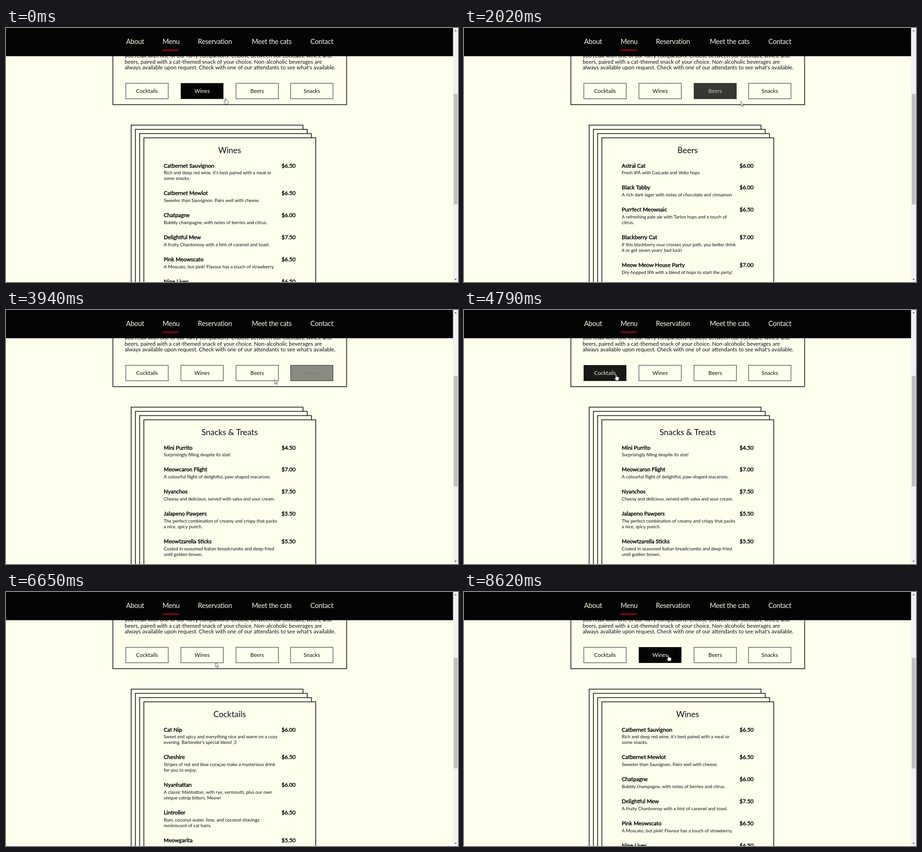
Write an HTML page with a canvas that moves like this. It is 960x540 px and loops after 8.7 s.

```html
<!DOCTYPE html>
<html lang="en">
<head>
<meta charset="utf-8">
<title>Cat café menu</title>
<style>
html, body { margin: 0; width: 100%; height: 100%; overflow: hidden; background: #ffffee; }
canvas { display: block; width: 960px; height: 540px; }
</style>
</head>
<body>
<canvas id="stage" width="960" height="540"></canvas>
<script>
const ctx = document.getElementById('stage').getContext('2d');
const LOOP = 8700;
const CREAM = '#ffffee', INK = '#0c0c12', BLACK = '#040404';
const FONT = 'Lato, "Open Sans", sans-serif';

// Each item: name, price, description lines
const MENUS = {
  Wines: ['Wines', [
    ['Catbernet Sauvignon', '6.50', "Rich and deep red wine, it's best paired with a meal or", 'some snacks.'],
    ['Catbernet Mewlot', '6.50', 'Sweeter than Sauvignon. Pairs well with cheese.'],
    ['Chatpagne', '6.00', 'Bubbly champagne, with notes of berries and citrus.'],
    ['Delightful Mew', '7.50', 'A fruity Chardonnay with a hint of caramel and toast.'],
    ['Pink Meowscato', '6.50', 'A Moscato, but pink! Flavour has a touch of strawberry.'],
    ['Nine Lives', '6.50', 'A smooth red blend with notes of dark cherry.']]],
  Beers: ['Beers', [
    ['Astral Cat', '6.00', 'Fresh IPA with Cascade and Velto hops'],
    ['Black Tabby', '6.00', 'A rich dark lager with notes of chocolate and cinnamon'],
    ['Purrfect Meowsaic', '6.50', 'A refreshing pale ale with Tarlon hops and a touch of', 'citrus.'],
    ['Blackberry Cat', '7.00', 'If this blackberry sour crosses your path, you better drink', "it or get seven years' bad luck!"],
    ['Meow Meow House Party', '7.00', 'Dry-hopped IPA with a blend of hops to start the party!']]],
  Snacks: ['Snacks & Treats', [
    ['Mini Purrito', '4.50', 'Surprisingly filling despite its size!'],
    ['Meowcaron Flight', '7.00', 'A colourful flight of delightful, paw-shaped macarons.'],
    ['Nyanchos', '7.50', 'Cheesy and delicious, served with salsa and sour cream.'],
    ['Jalapeno Pawpers', '5.50', 'The perfect combination of creamy and crispy that packs', 'a nice, spicy punch.'],
    ['Meowtzarella Sticks', '5.50', 'Coated in seasoned Italian breadcrumbs and deep-fried', 'until golden brown.'],
    ['Purrkoras', '4.50', 'Fried veggie goodness, generously seasoned.'],
    ['Sameowsas', '5.50', 'Choose between spicy potato and beef fillings.'],
    ['Veggie Tempurra', '4.50', 'Veggie dipped in batter and deep-fried to perfection.']]],
  Cocktails: ['Cocktails', [
    ['Cat Nip', '6.00', 'Sweet and spicy and everything nice and warm on a cozy', "evening. Bartender's special blend ;3"],
    ['Cheshire', '6.50', 'Stripes of red and blue curaçao make a mysterious drink', 'for you to enjoy.'],
    ['Nyanhattan', '6.00', 'A classic Manhattan, with rye, vermouth, plus our own', 'unique catnip bitters. Meow!'],
    ['Lintroller', '6.50', 'Rum, coconut water, lime, and coconut shavings', 'reminiscent of cat hairs.'],
    ['Meowgarita', '5.50', 'Tequila, solvandre, lime juice, and just a touch of', 'meowzcal for a smoky twist on a classic.'],
    ['Mewjito', '5.50', 'A refreshing cocktail, perfect for lounging in the sun.'],
    ['Moscow Mew', '6.00', 'A fizzy, tangy, sweet, and spicy vodka-based cocktail.'],
    ['Meowtini', '6.00', 'Vodka or Gin as you like it, served in the eponymous glass.']]]
};

// Card swaps: start time and the menu brought to the front
const SWAPS = [[1250, 'Beers'], [2710, 'Snacks'], [5458, 'Cocktails'], [7650, 'Wines']];
const HALF = 335;
// Moments where the card motion hangs: [start, length]
const STALLS = [[2940, 50], [3160, 100]];

// Buttons: label, left edge, hover start, hover end
const BUTTONS = [
  ['Cocktails', 254.5, 4515, 6290],
  ['Wines', 371.5, 6750, LOOP + 30],
  ['Beers', 488.5, 560, 1960],
  ['Snacks', 604.5, 2260, 3780]
];
const FADE = 300;

const NAV = [['About', 255], ['Menu', 332.5], ['Reservation', 407.5], ['Meet the cats', 522], ['Contact', 646.5]];

// Pointer tip: time, x, y
const POINTER = [
  [40, 466, 149], [840, 548, 134], [1930, 548, 134], [2020, 588, 156],
  [2450, 666, 135], [3710, 666, 135], [4130, 500, 157], [4550, 323, 137],
  [4970, 323, 137], [5300, 323, 134], [6190, 323, 134], [6650, 445, 150],
  [7120, 434, 134], [8695, 434, 134]
];

const clamp = v => Math.max(0, Math.min(1, v));
const smooth = v => { v = clamp(v); return v * v * (3 - 2 * v); };
const mix = (a, b, k) => a + (b - a) * k;

function text(str, x, y, size, color = INK, align = 'left') {
  ctx.font = `${size}px ${FONT}`;
  ctx.fillStyle = color;
  ctx.textAlign = align;
  ctx.fillText(str, x, y);
}

function boldText(str, x, y, align) {
  text(str, x, y, 11.65, '#000', align);
  ctx.strokeStyle = '#000';
  ctx.lineWidth = 0.45;
  ctx.strokeText(str, x, y);
}

function panel(x, y, w, h, line = 1.5) {
  ctx.fillStyle = CREAM;
  ctx.fillRect(x, y, w, h);
  ctx.strokeStyle = INK;
  ctx.lineWidth = line;
  ctx.strokeRect(x, y, w, h);
}

// dx, dy are offsets from the front place in the stack
function card(dx, dy, menu) {
  ctx.save();
  ctx.translate(dx, dy);
  panel(292.75, 233.5, 365, 496);
  if (menu) {
    const [title, items] = MENUS[menu];
    text(title, 475, 266, 17.4, INK, 'center');
    let y = 296.5;
    for (const [name, price, ...lines] of items) {
      boldText(name, 335, y);
      boldText('$' + price, 615, y, 'right');
      lines.forEach((s, i) => text(s, 335, y + 14.8 + i * 12, 9.71));
      y += 34.8 + lines.length * 12;
    }
  }
  ctx.restore();
}

function stack(t) {
  let clock = t;
  for (const [at, len] of STALLS) {
    if (t > at && t < 3600) clock -= Math.min(len, t - at);
  }
  let front = 'Wines', moving = null, age = 0;
  for (const [start, menu] of SWAPS) {
    if (clock < start) break;
    if (clock < start + 2 * HALF) { moving = menu; age = clock - start; }
    else front = menu;
  }
  if (!moving) {
    for (let i = 3; i >= 0; i--) card(-9 * i, -9 * i, i ? null : front);
    return;
  }
  const back = smooth(age / HALF - 1);
  const out = age < HALF ? smooth(age / HALF) : 1 - back;
  const settle = back * back;
  const base = -27 * (1 - settle);
  const drawMoving = () => card(base - 266.5 * out, base - 372.5 * out, moving);
  const onTop = age >= HALF || out > 0.4;
  if (!onTop) drawMoving();
  for (let i = 2; i >= 0; i--) {
    const d = -9 * (i + settle);
    card(d, d, i ? null : front);
  }
  if (onTop) drawMoving();
}

function hoverLevel(t, on, off) {
  const level = s => Math.min(clamp((s - on) / FADE), clamp(1 - (s - off) / FADE));
  return Math.max(level(t), level(t + LOOP));
}

function intro(t) {
  panel(227, -20, 496.5, 183);
  text('you relax with one of our furry companions. Choose between our cocktails, wines, and', 252, 63, 11.65);
  text('beers, paired with a cat-themed snack of your choice. Non-alcoholic beverages are', 252, 75.5, 11.65);
  text("always available upon request. Check with one of our attendants to see what's available.", 252, 88, 11.65);
  for (const [label, x, on, off] of BUTTONS) {
    const k = hoverLevel(t, on, off);
    const c = [255, 255, 238].map(v => Math.round(mix(v, 4, k)));
    const f = [255, 255, 238].map(v => Math.round(mix(12, v, k)));
    ctx.fillStyle = `rgb(${c})`;
    ctx.fillRect(x, 117.5, 90, 33);
    ctx.strokeStyle = '#2a2a2a';
    ctx.lineWidth = 1;
    ctx.strokeRect(x, 117.5, 90, 33);
    text(label, x + 45, 138.2, 11.65, `rgb(${f})`, 'center');
  }
}

function nav() {
  ctx.fillStyle = BLACK;
  ctx.fillRect(0, 0, 950, 60);
  ctx.letterSpacing = '-0.28px';
  for (const [label, x] of NAV) text(label, x, 33.5, 14.6, '#f8f8ea');
  ctx.letterSpacing = '0px';
  ctx.fillStyle = '#c80014';
  ctx.fillRect(332.5, 46, 34.5, 2);
}

function triangle(y, dir) {
  ctx.beginPath();
  ctx.moveTo(952.8, y + dir * 1.5);
  ctx.lineTo(957.2, y + dir * 1.5);
  ctx.lineTo(955, y - dir * 1.5);
  ctx.fill();
}

function scrollbar() {
  ctx.fillStyle = '#f1f1f1';
  ctx.fillRect(949.5, 0, 10.5, 540);
  ctx.fillStyle = '#c0c0c0';
  ctx.fillRect(951, 140, 8, 235);
  ctx.fillStyle = '#505050';
  triangle(5.5, 1);
  triangle(534.5, -1);
}

function pointerAt(t) {
  let prev = POINTER[0];
  for (const key of POINTER) {
    if (t < key[0]) {
      if (key === prev) break;
      const k = smooth((t - prev[0]) / (key[0] - prev[0]));
      return [mix(prev[1], key[1], k), mix(prev[2], key[2], k)];
    }
    prev = key;
  }
  return [prev[1], prev[2]];
}

const ARROW = new Path2D('M0 0V9.6L2.2 7.6L3.7 11L5.2 10.3L3.7 7H6.6Z');
const HAND = new Path2D('M-1 1Q0 -.8 1 1V5Q2.2 4.2 2.8 5.2Q4 4.6 4.5 5.7Q6 5.2 6.2 6.6V9.2Q6 11 5 12.8H-.2Q-1.5 10.8 -3.2 8.6Q-3.6 7 -2.2 7.2L-1 8.4Z');

function pointer(t) {
  const over = BUTTONS.some(([, , on, off]) => (t >= on && t < off) || t + LOOP < off);
  const [x, y] = pointerAt(t);
  const shape = over ? HAND : ARROW;
  ctx.save();
  ctx.translate(x, y);
  ctx.fillStyle = '#fff';
  ctx.strokeStyle = '#33333a';
  ctx.lineWidth = 0.8;
  ctx.lineJoin = 'round';
  ctx.fill(shape);
  ctx.stroke(shape);
  ctx.restore();
}

function draw(t) {
  ctx.fillStyle = CREAM;
  ctx.fillRect(0, 0, 960, 540);
  intro(t);
  stack(t);
  nav();
  scrollbar();
  pointer(t);
}

const begin = performance.now();
function tick() {
  draw((performance.now() - begin) % LOOP);
  requestAnimationFrame(tick);
}
tick();
</script>
</body>
</html>
```
